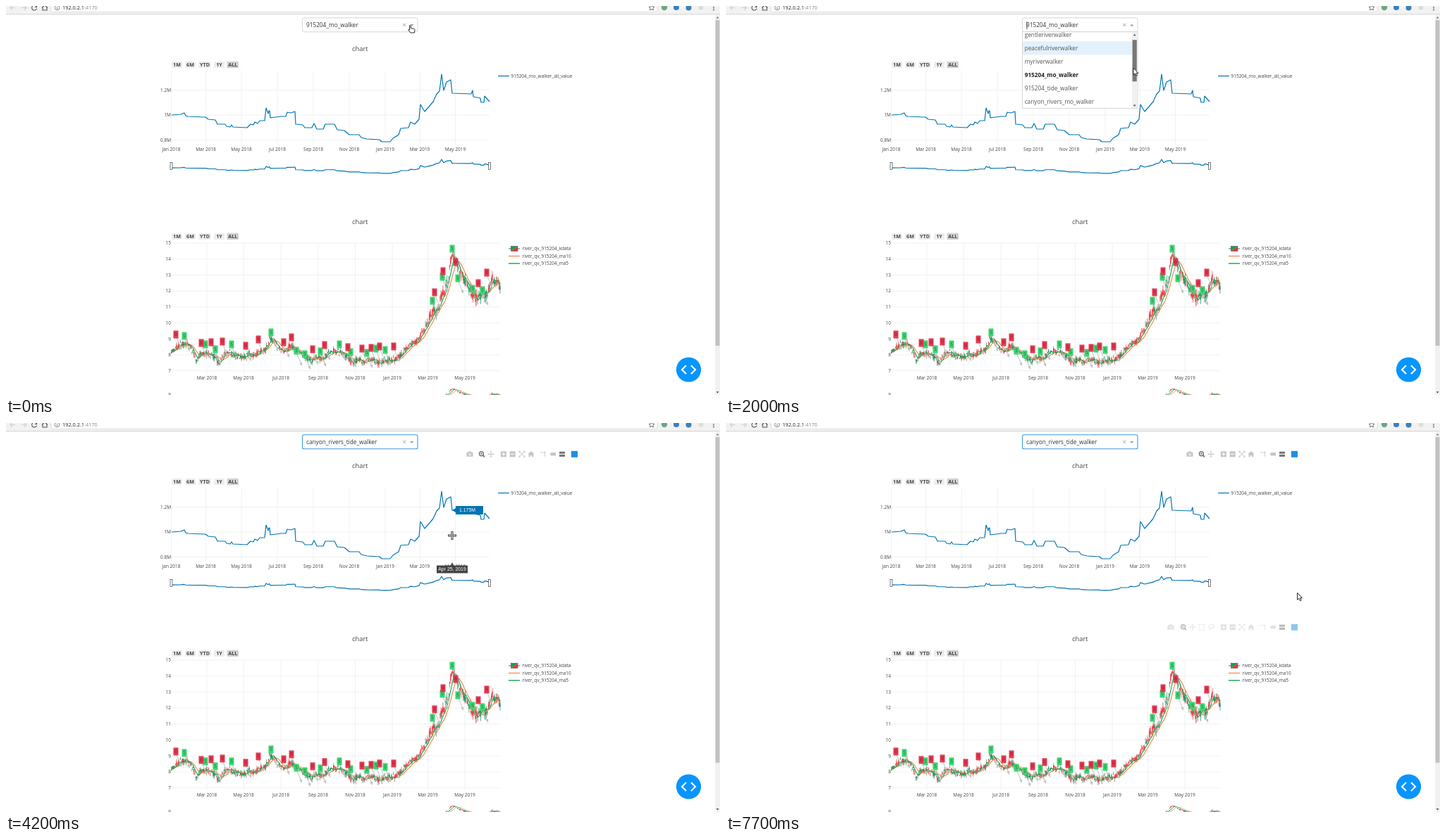
Animation, 1013 px wide and 553 px high, one loop 8000 ms. Source, as an HTML page:

```html
<!DOCTYPE html>
<html lang="en">
<head>
<meta charset="utf-8">
<title>Trader dashboard</title>
<style>
html, body { margin: 0; width: 100%; height: 100%; overflow: hidden; background: #fff; }
svg { display: block; width: 100vw; height: 100vh; }
text { font-family: "Open Sans", "Noto Sans", sans-serif; white-space: pre; }
.hover text { font-family: "Liberation Sans", Arial, sans-serif; }
</style>
</head>
<body>
<svg id="stage" viewBox="0 0 1013 553"></svg>
<script>
const LOOP = 8000;
const BLUE = '#0074b3', ORANGE = '#f5833f', GREEN = '#12a150', RED = '#ff4136';
const ID = '915204', FIRST = ID + '_mo_walker', PICKED = 'canyon_rivers_tide_walker';
const STOCK = 'river_qv_' + ID;
const OPTIONS = ['gentleriverwalker', 'peacefulriverwalker', 'myriverwalker', FIRST,
  ID + '_tide_walker', 'canyon_rivers_mo_walker', PICKED, 'gentlelakewalker'];
const ROW = 19.15;

// markup helpers
const text = (x, cy, s, size = 6.5, fill = '#444', extra = '') =>
  `<text x="${x}" y="${cy + size * 0.36}" font-size="${size}" fill="${fill}" ${extra}>${s}</text>`;
const mid = 'text-anchor="middle"', end = 'text-anchor="end"';
const rect = (x, y, w, h, fill, extra = '') =>
  `<rect x="${x}" y="${y}" width="${w}" height="${h}" fill="${fill}" ${extra}/>`;
const line = (d, stroke, width = 1, extra = '') =>
  `<path d="${d}" fill="none" stroke="${stroke}" stroke-width="${width}" ${extra}/>`;
const shape = (d, fill, extra = '') => `<path d="${d}" fill="${fill}" ${extra}/>`;
const dot = (x, y, r, fill) => `<circle cx="${x}" cy="${y}" r="${r}" fill="${fill}"/>`;
const group = (id, body, extra = '') => `<g id="${id}" ${extra}>${body}</g>`;

let seed = 338;
function rand() {
  seed = (seed * 1664525 + 1013904223) >>> 0;
  return seed / 4294967296;
}

const pairs = s => s.trim().split(/\s+/).map(p => p.split(',').map(Number));
const toPath = pts => 'M' + pts.map(([x, y]) => x.toFixed(2) + ' ' + y.toFixed(2)).join('L');

function sample(pts, x) {
  let i = 1;
  while (i < pts.length - 1 && pts[i][0] < x) i++;
  const [x0, y0] = pts[i - 1], [x1, y1] = pts[i];
  return y0 + (y1 - y0) * (x - x0) / (x1 - x0);
}

const value = pairs(`235,155 248,154 253,152 255,156 258,157 283,158 287,161 297,162 300,168 311,168
  313,171 318,172 320,169 322,172 342,173 347,168 351,169 353,165 357,167 360,163 367,163 369,145
  372,153 373,149 374,149 375,159 390,157 397,157 399,151 404,152 410,150 411,168 421,169 424,173
  434,173 437,167 441,175 450,175 453,168 466,168 470,176 480,177 487,183 501,183 504,187 512,189
  530,190 533,193 545,193 549,188 557,183 560,174 571,173 574,165 580,168 586,161 588,140 594,150
  601,142 606,136 611,125 615,121 618,97 621,120 625,108 631,105 633,124 660,125 662,120 663,129
  673,131 674,137 678,137 679,128 686,136`);

const price = pairs(`235,490 243,484 250,480 258,480 265,492 270,504 276,494 288,495 296,500 303,507
  309,496 318,492 324,497 336,500 345,494 352,498 360,489 368,490 374,472 381,478 388,488 396,492
  403,482 410,488 418,494 426,499 433,506 441,498 450,503 458,492 466,490 476,492 484,500 490,507
  500,503 510,505 519,500 527,507 540,504 552,503 560,496 566,487 571,482 576,480 583,476 590,464
  597,456 602,440 608,430 612,438 617,415 622,405 628,385 632,352 636,358 640,366 644,380 648,385
  654,398 660,410 666,414 671,416 676,408 681,414 686,398 690,388 696,395 701,398`);

function candles() {
  const days = 340, closes = [];
  const wick = ['', ''], body = ['', ''];
  for (let i = 0; i < days; i++) {
    const x = 235 + i * 466 / (days - 1), c = sample(price, x);
    const amp = x < 595 ? 8 : 13;
    const a = c + (rand() - 0.5) * amp, b = c + (rand() - 0.5) * amp;
    const hi = Math.min(a, b) - rand() * amp * 0.5, lo = Math.max(a, b) + rand() * amp * 0.5;
    const k = b < a ? 0 : 1, px = x.toFixed(1);
    wick[k] += `M${px} ${hi.toFixed(1)}V${lo.toFixed(1)}`;
    body[k] += `M${px} ${a.toFixed(1)}V${b.toFixed(1)}`;
    closes.push([x, b]);
  }
  const average = n => toPath(closes.map(([x], i) => {
    const part = closes.slice(Math.max(0, i - n + 1), i + 1);
    return [x, part.reduce((s, p) => s + p[1], 0) / part.length];
  }));
  const tones = ['#1f8a55', '#e8343c'];
  return tones.map((c, k) => line(wick[k], c, 0.7) + line(body[k], c, 1.2)).join('') +
    line(average(10), ORANGE, 1.1) + line(average(5), GREEN, 1.1);
}

function signals() {
  const buys = pairs(`241,467 277,479 291,478 307,477 340,483 358,474 394,478 405,471 435,488 452,482
    485,485 505,487 518,486 530,484 550,484 608,407 620,377 638,364 670,394 682,379`);
  const sells = pairs(`253,469 283,481 297,488 320,481 376,464 412,490 424,495 446,491 473,481 489,492
    512,493 525,487 538,489 605,419 619,385 633,345 641,387 662,402 676,404`);
  const arrow = ([x, y]) => line(`M${x + 1} ${y + 5}l5.500 13`, '#c3c3c3', 1) +
    shape(`M${x + 8} ${y + 22}l-3.800 -4 4 -1.700z`, '#c3c3c3');
  const tag = (fill, s, ink) => ([x, y]) => rect(x - 3.5, y - 5.5, 7, 11, fill) + text(x, y, s, 6.3, ink, mid);
  return [...buys, ...sells].map(arrow).join('') +
    sells.map(tag('#3dd470', 'S', '#17713a')).join('') +
    buys.map(tag('#e63950', 'B', '#9c1c30')).join('');
}

function rangeButtons(y) {
  return [['1M', 235, 15], ['6M', 254, 15], ['YTD', 273, 18], ['1Y', 295, 15], ['ALL', 313.5, 16.5]]
    .map(([s, x, w]) => rect(x, y - 4.7, w, 9.4, s === 'ALL' ? '#d2d2d2' : '#eee', 'rx="1.5"') +
      text(x + w / 2, y, s, 7.2, '#444', mid + ' font-weight="700"')).join('');
}

function grid(xs, ys, x1, y0, y1) {
  return line(xs.map(x => `M${x} ${y0}V${y1}`).join('') + ys.map(y => `M235 ${y}H${x1}`).join(''), '#eee', 0.8);
}

function valueChart() {
  const xs = [234.5, 283.5, 334, 385, 436, 487, 538, 587, 637.5];
  const months = ['Jan 2018', 'Mar 2018', 'May 2018', 'Jul 2018', 'Sep 2018', 'Nov 2018', 'Jan 2019', 'Mar 2019', 'May 2019'];
  const small = value.map(([x, y]) => [x, 218 + (y - 97) * 0.208]);
  const handle = x => rect(x - 1.5, 222.5, 3, 10, '#fff', 'stroke="#444" stroke-width=".7"');
  return rangeButtons(83.5) + grid(xs, [119.5, 155, 190.5], 686, 92, 197) +
    [['1.2M', 119.5], ['1M', 155], ['0.8M', 190.5]].map(([s, y]) => text(234, y, s, 6.5, '#444', end)).join('') +
    months.map((s, i) => text(xs[i], 203.5, s, 6.5, '#444', mid)).join('') +
    line(toPath(value), BLUE, 1.2, 'stroke-linejoin="round"') +
    line(toPath(small), BLUE, 1.2, 'stroke-linejoin="round"') + handle(234.5) + handle(686) +
    line('M698 99.500H714', BLUE, 1.2) + text(716.5, 99.5, FIRST + '_all_value', 6.5);
}

function priceChart() {
  const xs = [285, 337, 390, 443, 495.5, 548, 598.5, 651];
  const months = ['Mar 2018', 'May 2018', 'Jul 2018', 'Sep 2018', 'Nov 2018', 'Jan 2019', 'Mar 2019', 'May 2019'];
  const ys = Array.from({ length: 9 }, (_, i) => 337 + i * 22.7);
  const plot = candles();
  return rangeButtons(327.5) + grid(xs, ys, 701, 337, 522) +
    ys.map((y, i) => text(234, y, 15 - i, 6.5, '#444', end)).join('') +
    months.map((s, i) => text(xs[i], 528.5, s, 6.5, '#444', mid)).join('') +
    plot + signals() +
    `<g transform="translate(0 473.600) scale(1 .2)">${plot}</g>` + text(234, 553, '9', 6.5, '#444', end) +
    line('M713 345H729', '#1f8a55', 1) +
    shape('M716.500 341.500h9.500l-9.500 7z', GREEN) + shape('M726 341.500v7h-9.500z', '#e8343c') +
    rect(716.5, 341.5, 9.5, 7, 'none', 'stroke="#555" stroke-width=".6"') +
    line('M713 355.500H729', ORANGE, 1.2) + line('M713 366H729', GREEN, 1.4) +
    ['kdata', 'ma10', 'ma5'].map((s, i) => text(732.5, 345 + i * 10.4, STOCK + '_' + s)).join('');
}

function modebar(full) {
  const dim = '#c4c4c4', dark = '#747474';
  const at = (x, body) => `<g transform="translate(${x} 0)">${body}</g>`;
  const [camera, pan] = full ? [631, 662] : [658, 688];
  const zoom = full ? 649 : 675;
  return at(camera, shape('M-4.500 -2.500h2l1 -1.500h3l1 1.500h2v6h-9z', dim) + dot(0, 0.5, 1.8, '#fff') + dot(0, 0.5, 1, dim)) +
    at(zoom, `<circle cx="-.5" cy="-.5" r="3" fill="none" stroke="${dark}" stroke-width="1.400"/>` +
      line('M1.600 1.600L4 4', dark, 1.8) + line('M-2 -.5h3M-.5 -2v3', dark, 0.8)) +
    at(pan, line('M-4 0H4M0 -4V4M-2.800 -1.200L-4 0l1.200 1.200M2.800 -1.200L4 0l-1.200 1.200M-1.200 -2.800L0 -4l1.200 1.200M-1.200 2.800L0 4l1.200 -1.200', dim, 1)) +
    (full ? at(675, rect(-4, -4, 8, 8, 'none', `stroke="${dim}" stroke-dasharray="1.500 1"`)) +
      at(688.5, line('M-2.500 4C-1 2 -2 2 -3 1.500C-6 -1 -2 -4 1 -3.500C6 -3 4 2 0 1.500H-2', dim, 1)) : '') +
    at(706, rect(-4, -4, 8, 8, dim) + line('M-2.500 0h5M0 -2.500v5', '#fff', 1.2)) +
    at(718.7, rect(-4, -4, 8, 8, dim) + line('M-2.500 0h5', '#fff', 1.2)) +
    at(732, line('M-3.500 -3.500L3.500 3.500M3.500 -3.500L-3.500 3.500M-4 -2v-2h2M4 -2v-2h-2M-4 2v2h2M4 2v2h-2', dim, 1)) +
    at(745, shape('M0 -4l4.500 4h-1.200v4h-2.300v-2.500h-2v2.500h-2.300v-4h-1.200z', dim)) +
    at(762, line('M-4 -2.500H2M2.500 -2V4', dim, 1, 'stroke-dasharray="2 .6"') + dot(2.5, -2.5, 1, dim)) +
    at(776, shape('M-4.500 0l2 -2.300h6.500v4.600h-6.500z', dim)) +
    at(789, rect(-4, -3.6, 8, 3, dark) + rect(-4, 0.6, 8, 3, dark)) +
    at(806.5, rect(-4.5, -4.5, 9, 9, '#1f8fe0'));
}

function browser() {
  return rect(0, 0, 1013, 12, '#f2f2f2') + rect(64, -8, 860, 16.5, '#fff', 'rx="2" stroke="#d5d5d5" stroke-width=".7"') +
    line('M0 11.800H1013', '#c9c9c9', 0.8) +
    line('M13 2.500H6M9 -.5L6 2.500l3 3M22 2.500h7M26 -.5l3 3l-3 3', '#cfcfcf', 1.1) +
    line('M43 .5A3.500 3.500 0 1 0 43.500 3.500M43.500 -1v2.500h-2.500', '#555', 1.1) +
    line('M51 2.500l4 -3.500 4 3.500M52 2v4h6v-4', '#555', 1.1) +
    `<circle cx="72.500" cy="2.500" r="3.300" fill="none" stroke="#666" stroke-width=".8"/>` + line('M72.500 2v2.500M72.500 .5v.8', '#666', 0.9) +
    text(80, 2.5, '192.0.2.1<tspan fill="#888">:4170</tspan>', 7.35, '#222') +
    line('M916 -1.500l1.200 2.600 2.800 .3 -2.100 1.900 .6 2.700 -2.500 -1.400 -2.500 1.400 .6 -2.700 -2.100 -1.900 2.800 -.3z', '#555', 0.8) +
    dot(934, 2, 4.2, '#6fa583') + dot(951, 2, 4, '#3b7fc4') + dot(968.5, 2.5, 4, '#3c83b5') + dot(986, 2.5, 3.2, '#dcdcdc') +
    dot(1004, -0.5, 0.9, '#555') + dot(1004, 2.5, 0.9, '#555') + dot(1004, 5.5, 0.9, '#555') +
    rect(1006, 12.2, 7, 541, '#f1f1f1') + rect(1006.6, 20, 5.8, 463, '#c1c1c1') +
    shape('M1007.500 17.500l2 -2.500 2 2.500z', '#777') + shape('M1007.500 548l2 2.500 2 -2.500z', '#555');
}

function selectBox() {
  return rect(420.5, 16.8, 163.5, 20, '#fff', 'id="frame" rx="2"') +
    group('label', '') + line('M563.300 24.800l4 4M567.300 24.800l-4 4', '#999', 0.9) +
    shape('M573 26l2.700 2.800 2.700 -2.800z', '#999', 'id="down"') +
    shape('M573 28.500l2.700 -2.800 2.700 2.800z', '#999', 'id="up"') +
    line('M426.900 22.200V33', '#222', 0.8, 'id="caret"');
}

function menu() {
  const rows = OPTIONS.map((s, i) =>
    text(423.7, 46.6 + i * ROW, s, 8.25, s === FIRST ? '#222' : '#555', s === FIRST ? 'font-weight="700"' : '')).join('');
  return rect(420.5, 36.8, 163.5, 108.6, '#fff', 'stroke="#ccc" stroke-width=".8"') +
    `<g clip-path="url(#list)"><g id="rows">${rect(421, 37, 155, ROW, '#e3f1fd', 'id="focus"')}${rows}</g></g>` +
    rect(576, 37.3, 7.5, 107.7, '#f1f1f1') + rect(576.6, 45, 6.2, 59, '#c1c1c1', 'id="thumb"') +
    shape('M577.700 42.200l2 -2.500 2 2.500z', '#555') + shape('M577.700 140.500l2 2.500 2 -2.500z', '#555');
}

function priceHover() {
  const rows = ['open: 7.947009', 'high: 7.957138', 'low: 7.683122', 'close: 7.692718  ▼'];
  const name = STOCK.slice(0, 12) + '...';
  return rect(459, 528, 44, 10.5, '#444') + shape('M478.500 528.300l2.500 -4 2.500 4z', '#444') + text(461, 533.3, 'Oct 15, 2018', 6.9, '#fff') +
    rect(519, 474, 52, 23.5, '#fff', 'opacity=".8"') + rect(549, 498, 62, 38, '#fff', 'opacity=".8"') +
    rect(484, 474.5, 35, 11.5, ORANGE) + text(486, 480.3, '8.154334', 6.9, '#444') + text(520, 480.3, name, 6.9, ORANGE) +
    rect(484, 486.3, 35, 11, GREEN) + text(486, 491.8, '8.021324', 6.9, '#fff') + text(520, 491.8, name, 6.9, GREEN) +
    rect(484, 498, 65, 38, RED) + rows.map((s, i) => text(485.7, 503.4 + i * 9.2, s, 6.9, '#fff')).join('') +
    text(551, 503.4, name, 6.9, RED);
}

function valueHover() {
  return rect(611, 202.5, 44, 11, '#444') + shape('M630.500 203l2.500 -5 2.500 5z', '#444') + text(633, 208, 'Apr 25, 2019', 6.9, '#fff', mid) +
    shape('M633 124l5 -3v-3h39v12h-39v-3z', BLUE) + text(643, 124, '1.175M', 6.9, '#fff');
}

const pointers = {
  arrow: shape('M0 0V9.800l2.300 -2 1.600 3.500 1.700 -.8 -1.600 -3.300h3z', '#fff', 'stroke="#111" stroke-width=".9" stroke-linejoin="round"'),
  hand: shape('M-2.500 -4.500q1 -1 1.800 .2v3.300l4.300 .9q1.600 .5 1.400 2l-.7 3.600h-5.400l-3.200 -4q.3 -1.300 1.800 -.2z', '#fff', 'stroke="#111" stroke-width=".9" stroke-linejoin="round"'),
  cross: line('M-6 0H6M0 -6V6', '#333', 3) + line('M-5.200 0H5.200M0 -5.200V5.200', '#fff', 1.1) + dot(0, 0, 0.8, '#333')
};

// [start, pointer, x, y]
const moves = [
  [0, 'hand', 575, 32.5], [700, 'arrow', 574.6, 55], [800, 'arrow', 577, 63], [900, 'arrow', 579, 71],
  [1000, 'arrow', 580, 77.7], [1400, 'arrow', 580.6, 78], [1900, 'arrow', 578, 85], [4200, 'cross', 633, 160],
  [5100, 'arrow', 634.3, 242], [5400, 'arrow', 638.3, 259], [6300, 'arrow', 633.3, 268.500],
  [6600, 'arrow', 611.3, 266.500], [7000, 'cross', 481, 364.5], [7400, 'cross', 484, 372], [7700, 'arrow', 810.6, 241.500]
];

const stage = document.getElementById('stage');
stage.innerHTML = '<defs><clipPath id="list"><rect x="421" y="37.300" width="155" height="107.700"/></clipPath></defs>' +
  rect(0, 0, 1013, 553, '#fff') + text(502.3, 61, 'chart', 9.3, '#444', mid) + text(502.3, 307, 'chart', 9.3, '#444', mid) +
  valueChart() + priceChart() + group('bar1', modebar(false), 'transform="translate(0 44.300)"') +
  group('bar2', modebar(true), 'transform="translate(0 290.300)"') +
  group('hover1', valueHover(), 'class="hover"') + group('hover2', priceHover(), 'class="hover"') +
  dot(968.5, 517, 17.6, '#0795ff') + line('M965 511l-6 6 6 6M972 511l6 6 -6 6', '#fff', 2.2) +
  browser() + selectBox() + group('menu', menu()) +
  Object.keys(pointers).map(k => group(k, pointers[k])).join('');

const $ = id => document.getElementById(id);
const set = (id, attrs) => { for (const k in attrs) $(id).setAttribute(k, attrs[k]); };
const show = (id, on) => set(id, { visibility: on ? 'visible' : 'hidden' });
const shift = (id, x, y) => set(id, { transform: `translate(${x} ${y})` });
const labels = [FIRST, PICKED].map(s => text(426, 27.3, s, 8.25, '#333'));

function draw(t) {
  const within = (a, b) => t >= a && t < b;
  const open = within(400, 4200), done = t >= 4200;

  $('label').innerHTML = labels[done ? 1 : 0];
  set('frame', { stroke: done ? '#3c98e8' : '#ccc', 'stroke-width': done ? 1.1 : 0.8 });
  show('menu', open);
  show('up', open);
  show('down', !open);
  show('caret', open && !within(1000, 1600));

  // dragging the list moves in 100 ms steps
  const step = Math.floor((Math.min(t, 2500) - 1900) / 100);
  const scroll = step > 0 ? 6 + (step - 1) * 7.2 : 0;
  shift('rows', 0, -scroll);
  set('focus', { y: 37 + ROW * (t < 700 ? 3 : t < 800 ? 0 : 1) });
  set('thumb', { y: 45 + scroll * 0.535, fill: t >= 1900 ? '#787878' : '#c1c1c1' });

  show('bar1', within(4200, 7000) || t >= 7700);
  show('bar2', t >= 7000);
  set('bar2', { opacity: t >= 7700 ? 0.5 : 1 });
  show('hover1', within(4200, 5100));
  show('hover2', within(7000, 7700));
  shift('hover2', t >= 7400 ? 2.5 : 0, t >= 7400 ? 7 : 0);

  const [, kind, x, y] = moves.filter(m => m[0] <= t).pop();
  for (const k in pointers) show(k, k === kind);
  shift(kind, x, y + (t < 4200 ? scroll * 0.52 : 0));
}

function tick() {
  draw(performance.now() % LOOP);
  requestAnimationFrame(tick);
}
tick();
</script>
</body>
</html>
```
